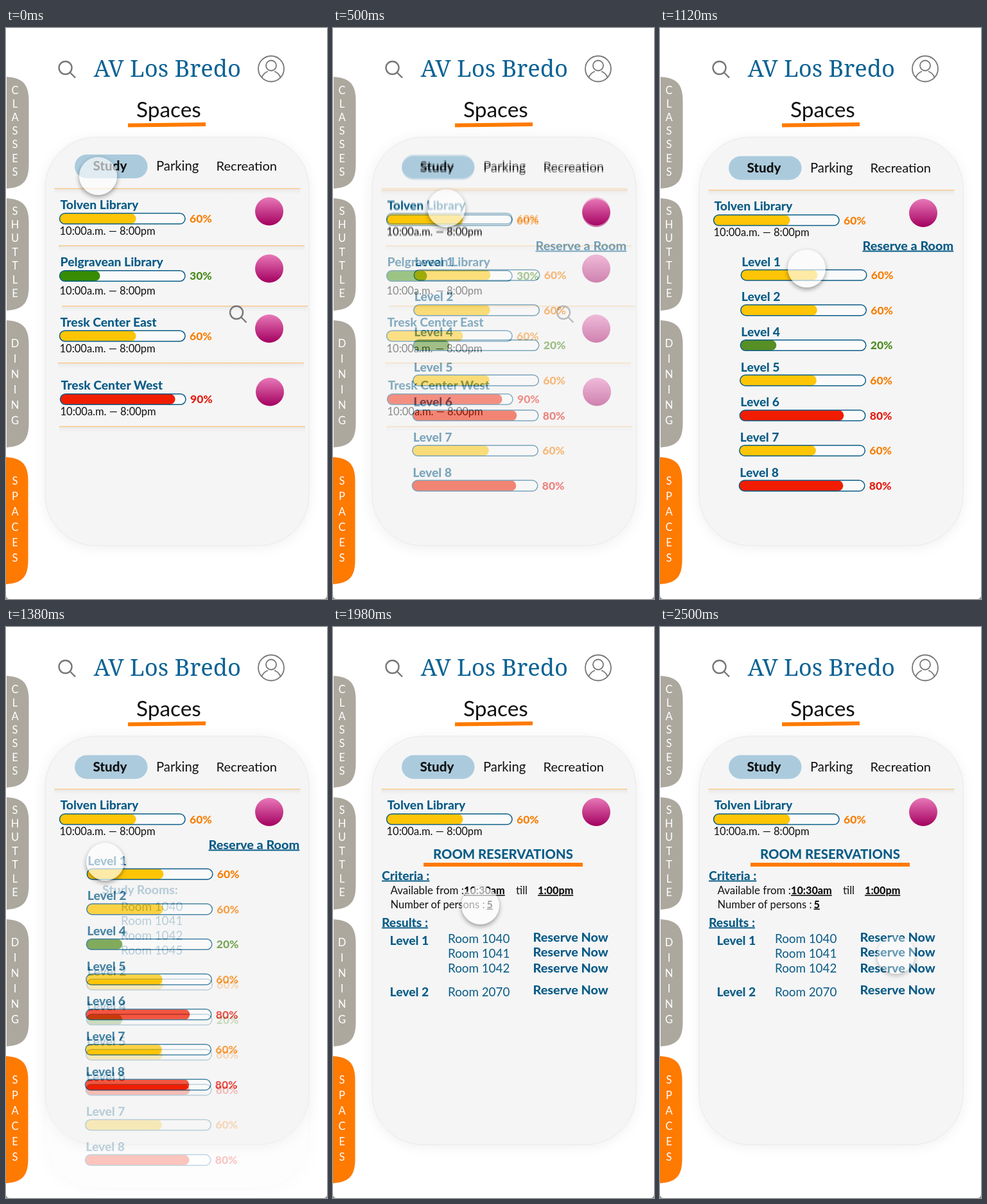
An HTML page for the animation above (2.52 s loop, 500 by 889 pixels).

```html
<!DOCTYPE html>
<html lang="en">
<head>
<meta charset="utf-8">
<title>Spaces</title>
<style>
  html, body { margin: 0; height: 100%; overflow: hidden; background: #fff; }
  svg { display: block; width: 100vw; height: 100vh; font-family: Lato, sans-serif; }
  #views { isolation: isolate; }
  .view { mix-blend-mode: plus-lighter; }
  .card { fill: #f5f5f5; stroke: #e8e8e8; filter: drop-shadow(0 3px 9px rgba(0, 0, 0, .06)); }
  .bold { font-weight: 800; }
  .link { text-decoration: underline; }
  .line { fill: none; stroke: #77777b; stroke-width: 2.4; }
  #touch {
    position: absolute; left: -29.5px; top: -29.5px; width: 59px; height: 59px; border-radius: 50%;
    background: rgba(255, 255, 255, .64); box-shadow: 0 3px 7px rgba(0, 0, 0, .38);
  }
</style>
</head>
<body>
<svg viewBox="0 0 500 889">
  <defs>
    <linearGradient id="ball" x2="0" y2="1"><stop stop-color="#e878b8"/><stop offset="1" stop-color="#a3005f"/></linearGradient>
    <linearGradient id="shade" x2="0" y2="1"><stop stop-opacity=".05"/><stop offset="1" stop-opacity="0"/></linearGradient>
  </defs>
  <g id="views"></g>
  <g id="frame"></g>
</svg>
<div id="touch"></div>
<script>
const BLUE = '#0a5c87', ORANGE = '#ff7a00', YELLOW = '#fec506', RED = '#f01d00';
const $ = id => document.getElementById(id);

// Bar look for each percentage: filled width, fill colour, label colour
const LEVELS = {
  20: [56, '#578f25', '#4b8a1e'],
  30: [63, '#378c05', '#4b8a1e'],
  60: [119, YELLOW, '#f77f05'],
  80: [162, RED, '#e41b10'],
  90: [179, RED, '#e41b10']
};

const text = (x, y, s, size, fill = '#111', cls = '', extra = '') =>
  `<text x="${x}" y="${y}" font-size="${size}" fill="${fill}" class="${cls}" ${extra}>${s}</text>`;
const bold = (x, y, s, cls = '', size = 19.3, fill = BLUE) => text(x, y, s, size, fill, 'bold ' + cls);
const rect = (x, y, w, h, fill, rx = 0, extra = '') =>
  `<rect x="${x}" y="${y}" width="${w}" height="${h}" rx="${rx}" fill="${fill}" ${extra}/>`;
const card = bottom => rect(61, 170, 411, bottom - 170, '#f5f5f5', 79, 'class="card"');
const ball = (x, y) => `<circle cx="${x}" cy="${y}" r="22" fill="url(#ball)"/>`;
const divider = (x, y) => rect(x, y, 383, 9, 'url(#shade)') + rect(x, y - .7, 383, 1.4, '#f9c886');
const lens = (x, y) => `<path class="line" d="M${x - 10} ${y}a10 10 0 1 1 20 0a10 10 0 1 1-20 0M${x + 7} ${y + 7}l8.5 8.5"/>`;

function bar(x, y, percent) {
  const [width, fill, label] = LEVELS[percent];
  return rect(x, y - 8.3, 195.5, 16.6, '#fafafa', 8.3) +
    rect(x, y - 8.3, width, 16.6, fill, 8.3) +
    rect(x, y - 8.3, 195.5, 16.6, 'none', 8.3, `stroke="${BLUE}" stroke-width="1.5"`) +
    bold(x + 202.5, y + 6.2, percent + '%', '', 17.5, label);
}

const place = (x, y, name, percent, ballY, timeGap = 25) =>
  bold(x + 1, y - 15, name) + bar(x, y, percent) +
  text(x, y + timeGap, '10:00a.m. — 8:00pm', 16.5) + ball(x + 326.5, ballY);

const head = dy => `<g transform="translate(0 ${dy})">` +
  rect(107, 199.5, 113.5, 37, '#abcbdd', 18.5) +
  bold(135.5, 224.5, 'Study', '', 20.5, '#111') +
  text(234, 224.5, 'Parking', 20.3) + text(327.5, 224.5, 'Recreation', 20.1) +
  divider(75.5, 252.5) + place(83.5, 299.3, 'Tolven Library', 60, 288) + '</g>';

const floor = (n, percent, i, dy = 0) => {
  const x = 126.3 - i * .5, y = 384.7 + i * 54.65 + dy;
  return bold(x + 1, y - 14, 'Level ' + n) + bar(x, y, percent);
};
const upper = dy => [[2, 60], [4, 20], [5, 60], [6, 80], [7, 60], [8, 80]]
  .map(([n, percent], i) => floor(n, percent, i + 1, dy)).join('');
const room = (y, n) => text(179, y, 'Room ' + n, 18.8, BLUE);
const reserve = bold(315.5, 345.5, 'Reserve a Room', 'link', 19.8);

const views = [
  card(806) + head(-2.5) +
    divider(82, 339) + place(83.5, 386, 'Pelgravean Library', 30, 374.5, 29) +
    divider(87, 433) + place(83.5, 479.5, 'Tresk Center East', 60, 468) +
    divider(81, 521.5) + place(84.5, 578, 'Tresk Center West', 90, 566.5) +
    divider(83, 620.5) + lens(359, 443),

  card(806) + head(0) + reserve + floor(1, 60, 0) + upper(0),

  card(874) + head(0) + reserve + floor(1, 60, 0) + bold(150, 416, 'Study Rooms:') +
    [1040, 1041, 1042, 1045].map((n, i) => room(441.5 + i * 22.7, n)).join('') + upper(117.3),

  card(806) + head(0) + bold(156, 361, 'ROOM RESERVATIONS', '', 20.3) +
    rect(141, 367, 248, 6, ORANGE) +
    bold(76, 393.5, 'Criteria :', 'link') +
    text(89.5, 416, 'Available from :', 16.9) + bold(204, 416, '10:30am', 'link', 16.2, '#111') +
    text(285, 416, 'till', 16.5) + bold(319, 416, '1:00pm', 'link', 16.2, '#111') +
    text(89.5, 437.5, 'Number of persons :', 16.5) + bold(239.5, 437.5, '5', 'link', 16.2, '#111') +
    bold(76, 466.5, 'Results :', 'link') +
    bold(88.5, 494.5, 'Level 1') + bold(88.5, 574.5, 'Level 2') +
    room(492, 1040) + room(514.5, 1041) + room(537.5, 1042) + room(574.5, 2070) +
    [489.5, 512.5, 537.5, 572].map(y => bold(311.5, y, 'Reserve Now', '', 19.8)).join('')
];
$('views').innerHTML = views.map(v => `<g class="view">${v}</g>`).join('');

function sideTab(word, x, top, bottom, first, step, fill) {
  const right = x + 34.5;
  const shape = `<path fill="${fill}" d="M${x} ${top}C${x + 24} ${top + 2} ${right} ${top + 10} ${right} ${top + 38}` +
    `V${bottom - 38}C${right} ${bottom - 10} ${x + 24} ${bottom - 2} ${x} ${bottom}Z"/>`;
  return shape + [...word].map((c, i) =>
    text(14, first + i * step + 6, c, 16.5, '#fff', '', 'text-anchor="middle"')).join('');
}

$('frame').innerHTML =
  sideTab('CLASSES', 1, 76, 250, 96.5, 21.2, '#aca89e') +
  sideTab('SHUTTLE', 1, 265, 440, 284.5, 21.4, '#aca89e') +
  sideTab('DINING', 1, 455, 653, 491, 24, '#aca89e') +
  sideTab('SPACES', 0, 668, 866, 705, 24, ORANGE) +
  lens(92.5, 62) +
  text(136.5, 76, 'AV Los Bredo', 36.3, '#0b6294', '', 'font-family="Noto Serif, serif"') +
  `<g class="line" style="stroke-width:1.8"><circle cx="413" cy="63.5" r="20"/><circle cx="413" cy="58.5" r="8"/>
   <path d="M398.5 77C401 70 405 69 408 67.5M418 67.5C421 69 425 70 427.5 77"/></g>` +
  text(203, 139, 'Spaces', 33.4) +
  `<path fill="${ORANGE}" d="M190 148.5L311 147V153L190 154.5Z"/>
   <path fill="#8a8a8a" d="M0 883Q0 889 6 889H0ZM500 883Q500 889 494 889H500Z"/>`;

const LOOP = 2520, FADE = 120;
const fadeStarts = [-FADE, 438, 1350, 1800];
const path = [
  [0, 143, 230], [60, 143, 230], [400, 176, 280], [540, 176, 280], [1120, 228, 374],
  [1300, 154, 365], [1400, 154, 365], [1640, 233, 516], [1770, 386, 345], [1820, 386, 345],
  [1980, 229, 433], [2080, 229, 433], [2440, 367, 510], [LOOP, 367, 510]
];
const clamp = v => Math.min(1, Math.max(0, v));
const groups = [...document.querySelectorAll('.view')];

function draw(now) {
  const t = now % LOOP;
  const shown = fadeStarts.map(start => clamp((t - start) / FADE));
  groups.forEach((g, i) => {
    const opacity = shown[i] - (shown[i + 1] || 0);
    g.style.opacity = opacity;
    g.style.display = opacity ? '' : 'none';
  });

  const i = path.findIndex(p => p[0] > t);
  const [t0, x0, y0] = path[i - 1], [t1, x1, y1] = path[i];
  const u = (t - t0) / (t1 - t0), e = u * u * (3 - 2 * u);
  const touch = $('touch').style;
  touch.transform = `translate(${x0 + (x1 - x0) * e}px, ${y0 + (y1 - y0) * e}px)`;
  // The touch lifts off just before the loop restarts
  touch.opacity = 1 - .4 * clamp((t - 2440) / 60);
  requestAnimationFrame(() => draw(performance.now()));
}
draw(0);
</script>
</body>
</html>
```
